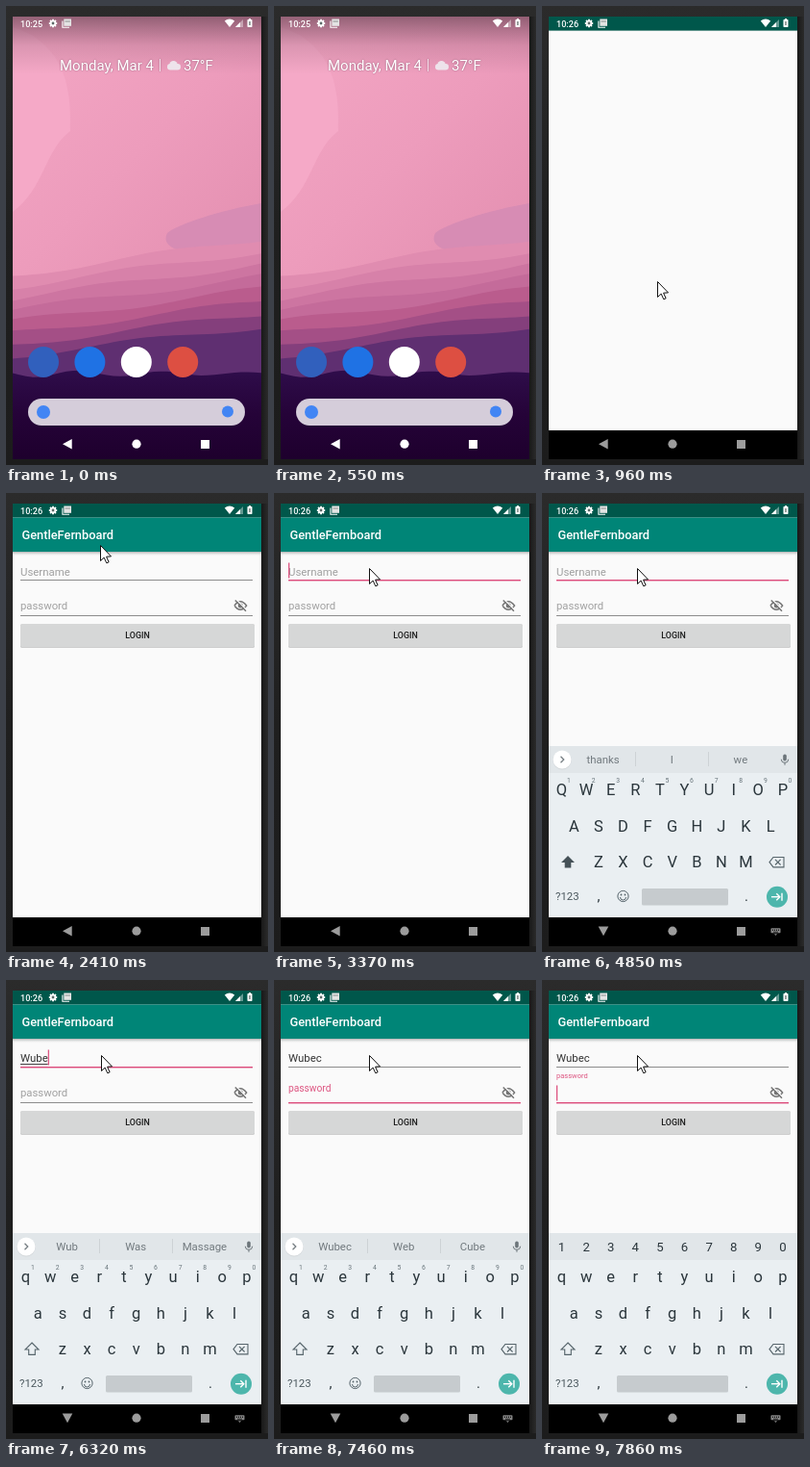
Write an HTML page with a canvas that moves like this. It is 273 px wide and 477 px high and loops after 8000 ms.

```html
<!DOCTYPE html>
<html lang="en">
<head>
<meta charset="utf-8">
<title>Phone login</title>
<style>
html, body { margin: 0; width: 100%; height: 100%; overflow: hidden; background: #202020; }
canvas { display: block; width: 273px; height: 477px; }
</style>
</head>
<body>
<canvas id="stage"></canvas>
<script>
const W = 273, H = 477, LOOP = 8000;
const LEFT = 7, TOP = 11, RIGHT = 266, BOTTOM = 471, WIDE = RIGHT - LEFT;
const NAV = 441, MID = 135.7, KEY = 25.6;
const PINK = '#dc4a7a', GREY = '#8c8c8c', HINT = '#a0a0a0', INK = '#2b363c', ICON = '#56646b';
const APP = 'GentleFernboard', USER = 'Wubec';

// Moments in ms
const OPEN = 960, FORM = 2410, FOCUS = 3100, NAV_DOWN = 3780, KEYS_IN = 4210, SHIFT_ON = 4730;
const TYPED = [5000, 5890, 6050, 6320, 6470];
const PASS = 7460, PASS_KEYS = 7740;
const WORDS = [[0, 'thanks I we'], [5150, 'W We Was'], [5890, 'Wu Wi Win'],
  [6190, 'Wub Was Massage'], [6470, 'Wubec Web Cube']];

const canvas = document.getElementById('stage');
const c = canvas.getContext('2d');
const dpr = window.devicePixelRatio || 1;
canvas.width = W * dpr;
canvas.height = H * dpr;

const mix = (a, b, k) => a + (b - a) * k;
const easeOut = k => 1 - (1 - k) ** 2;
const progress = (t, start, end) => Math.min(1, Math.max(0, (t - start) / (end - start)));

function rect(x, y, w, h, fill) {
  c.fillStyle = fill;
  c.fillRect(x, y, w, h);
}

function disc(x, y, r, fill) {
  c.fillStyle = fill;
  c.beginPath();
  c.arc(x, y, r, 0, 7);
  c.fill();
}

function pill(x, y, w, h, r, fill) {
  c.fillStyle = fill;
  c.beginPath();
  c.roundRect(x, y, w, h, r);
  c.fill();
}

function trace(points, closed) {
  c.beginPath();
  points.forEach(([x, y]) => c.lineTo(x, y));
  if (closed) c.closePath();
}

function poly(points, fill) {
  trace(points, true);
  c.fillStyle = fill;
  c.fill();
}

function line(points, color, width = 1, closed = false) {
  trace(points, closed);
  c.strokeStyle = color;
  c.lineWidth = width;
  c.stroke();
}

function text(str, x, y, size, color, align = 'left', weight = 400) {
  c.font = `${weight} ${size}px Roboto, sans-serif`;
  c.textAlign = align;
  c.fillStyle = color;
  c.fillText(str, x, y);
  return c.measureText(str).width;
}

function fade(x0, y0, x1, y1, ...colors) {
  const g = c.createLinearGradient(x0, y0, x1, y1);
  colors.forEach((col, i) => g.addColorStop(i / (colors.length - 1), col));
  return g;
}

// Fills everything below the curve y = height(x).
function hill(height, fill) {
  const points = [[RIGHT, BOTTOM], [LEFT, BOTTOM]];
  for (let x = LEFT; x <= RIGHT; x += 7) points.push([x, height(x)]);
  poly(points, fill);
}

function drawDesktop() {
  rect(0, 0, W, H, fade(0, 0, 0, H, '#2b2b2b', '#1f1f1f', '#1c1c1c'));
  rect(RIGHT, TOP, W - RIGHT, BOTTOM - TOP, fade(RIGHT, 0, W, 0, '#191919', '#2a2a2a'));
}

function drawStatus(clock) {
  const white = '#fff';
  text(clock, 15, 21.5, 9.1, white, 'left', 500);
  for (let i = 0; i < 4; i++) {
    const a = i * Math.PI / 4, dx = 4.2 * Math.cos(a), dy = 4.2 * Math.sin(a);
    line([[49 - dx, 18 - dy], [49 + dx, 18 + dy]], white, 1.9);
  }
  disc(49, 18, 3.2, white);
  disc(49, 18, 1.4, '#5c6a68');
  line([[58.9, 15.5], [58.9, 22.3], [66, 22.3]], white, 1.1);
  rect(60.3, 13.5, 7.7, 7.3, '#e4e4e4');
  line([[61.5, 16], [66.8, 16]], '#8a8f8e');
  c.fillStyle = white;
  c.beginPath();
  c.moveTo(233, 22);
  c.lineTo(227.8, 15.6);
  c.quadraticCurveTo(233, 11.6, 238.2, 15.6);
  c.fill();
  poly([[239, 22], [247, 22], [247, 14]], 'rgba(255,255,255,.4)');
  poly([[239, 22], [244, 22], [244, 17]], white);
  pill(251.5, 14, 5, 8, .8, white);
  rect(253, 13, 2, 1.2, white);
  rect(253.4, 16, 1.2, 4, '#55605e');
}

function drawNav(color, typing) {
  c.save();
  c.translate(64, 455.3);
  if (typing) c.rotate(-Math.PI / 2);
  poly([[4.7, -5.3], [4.7, 5.3], [-5, 0]], color);
  c.restore();
  disc(136, 455.2, 4.6, color);
  rect(203, 451, 9, 9, color);
  if (!typing) return;
  pill(238.5, 452.3, 10, 5, .8, '#858585');
  for (let x = 240; x < 248; x += 2) rect(x, 453.6, 1, 1.2, '#000');
  rect(241, 455.8, 5, .7, '#000');
  poly([[242, 458.3], [245, 458.3], [243.5, 460]], '#858585');
}

function drawWallpaper() {
  rect(LEFT, TOP, WIDE, BOTTOM - TOP, fade(30, 60, 230, 260, '#f2a4c2', '#ed9cbc', '#e591b2'));
  c.fillStyle = '#f5a9c7';
  c.beginPath();
  c.moveTo(LEFT, 22);
  c.bezierCurveTo(66, 40, 68, 95, 67, 130);
  c.bezierCurveTo(40, 150, 40, 190, LEFT, 214);
  c.fill();
  c.fillStyle = '#d78cb4';
  c.beginPath();
  c.moveTo(RIGHT, 205);
  c.bezierCurveTo(225, 212, 180, 226, 168, 236);
  c.bezierCurveTo(162, 248, 175, 256, 200, 256);
  c.lineTo(RIGHT, 245);
  c.fill();

  const bands = ['#e08cb0', '#d781a9', '#cd75a1', '#c46b9a', '#ba5c8d', '#a44f86', '#843f7c', '#5f2f71'];
  bands.forEach((fill, i) => {
    const left = 280 + 12 * i, right = 242 + 13 * i;
    hill(x => mix(left, right, (x - LEFT) / WIDE) + 3 * Math.sin(x / 35 + i), fill);
  });
  hill(x => 382 - 4 * (1 - x / 400) * Math.sin(x / 14 + 2.5), fade(0, 378, 0, BOTTOM, '#2f0d4b', '#250338', '#1e002d'));
  rect(LEFT, TOP, WIDE, 60, fade(0, 11, 0, 71, 'rgba(45,25,35,.48)', 'rgba(60,30,45,.14)', 'rgba(60,30,45,0)'));
}

function drawHome() {
  drawWallpaper();
  drawStatus('10:25');

  c.shadowColor = 'rgba(60,20,50,.5)';
  c.shadowBlur = 2 * dpr;
  text('Monday, Mar 4', 56, 67, 15, '#fff');
  rect(160, 55, 1, 13, '#f3dde8');
  text('37°F', 185, 67, 15, '#fff');
  c.shadowBlur = 0;
  pill(168, 60, 14, 6.5, 3.2, '#eee3eb');
  disc(174.5, 61.3, 4.3, '#eee3eb');

  ['#3160bd', '#1f72e4', '#ffffff', '#dd4f42'].forEach((col, i) => disc(39 + i * 48.4, 370, 16, col));
  pill(23, 408, 226, 28, 14, '#d5cdda');
  disc(39, 422, 7, '#4285f4');
  disc(231, 421.5, 6, '#4285f4');
  drawNav('#fff', false);
}

function drawCursor(t) {
  let x = 98, y = 54;
  if (t < 1110) [x, y] = [120, 286];
  else if (t < 1270) [x, y] = [108, 107];
  else if (t >= 2690) [x, y] = [99, mix(66, 78, progress(t, 2690, 2950))];
  c.save();
  c.translate(x + .5, y + .5);
  const shape = [[0, 0], [0, 16], [3.7, 12.6], [6.3, 18.3], [8.6, 17.3], [6.1, 11.7], [11, 11.4]];
  poly(shape, '#fff');
  line(shape, '#111', 1, true);
  c.restore();
}

function drawEye() {
  c.strokeStyle = '#747474';
  c.lineWidth = 1.5;
  c.beginPath();
  c.moveTo(238, 117);
  c.quadraticCurveTo(244.2, 108.5, 250.6, 117);
  c.quadraticCurveTo(244.2, 125.5, 238, 117);
  c.stroke();
  disc(244.3, 117, 2.5, '#747474');
  line([[239.8, 110.8], [251, 122]], '#fafafa', 1.5);
  line([[238.8, 111.5], [250, 122.7]], '#747474', 1.5);
}

function drawField(y, focused, caretX) {
  rect(15, y, 242, focused ? 1.4 : 1, focused ? PINK : GREY);
  if (caretX) rect(caretX, y - 17.5, 1.2, 16, PINK);
}

function drawForm(t) {
  rect(LEFT, 61, WIDE, 4, fade(0, 61, 0, 65, '#b4b4b4', '#e4e4e4', '#fafafa'));
  rect(LEFT, 25.6, WIDE, 35.4, '#008577');
  text(APP, 16.5, 48, 12.8, '#fff', 'left', 500);

  const onPass = t >= PASS, onUser = t >= FOCUS && !onPass;
  const count = TYPED.filter(time => t >= time).length;
  const lastEdit = Math.max(...[3220, ...TYPED, 7590].filter(time => t >= time));
  const caret = Math.floor((t - lastEdit) / 500) % 2 === 0;

  let typed = 0;
  if (count) typed = text(USER.slice(0, count), 15, 85, 11.4, '#333');
  else text('Username', 15, 85.5, 11.4, HINT);
  if (onUser) rect(15, 87, typed, 1, '#444');
  drawField(90, onUser, onUser && caret && 15 + typed);

  const rise = easeOut(progress(t, PASS - 50, PASS_KEYS));
  text('password', 15, mix(121, 102, rise), mix(11.3, 7.5, rise), onPass ? '#dd5581' : HINT);
  drawField(127, onPass, onPass && caret && 15);
  drawEye();

  pill(15, 136.5, 244, 24.3, 1.5, '#c0c0c0');
  pill(15, 136, 244, 24, 1.5, '#d6d7d7');
  text('LOGIN', 137, 151, 8.9, '#1c1c1c', 'center', 500);
}

function drawStrip(words) {
  disc(21, 277.6, 9.8, '#d3d7da');
  disc(21, 277, 9.5, '#fff');
  line([[19.5, 273.8], [22.7, 277], [19.5, 280.2]], '#777f84', 1.3);
  rect(97, 269, 1, 15, '#cdd2d5');
  rect(173, 269, 1, 15, '#cdd2d5');
  words.forEach((word, i) => text(word, 63.5 + i * 71.7, 281, 11.4, '#71797e', 'center'));
  pill(251.2, 271.5, 3.6, 7, 1.8, '#6c757a');
  c.strokeStyle = '#6c757a';
  c.lineWidth = 1;
  c.beginPath();
  c.arc(253, 276.7, 3.7, 0, Math.PI);
  c.moveTo(253, 280.4);
  c.lineTo(253, 282.8);
  c.stroke();
}

// One row of keys, centred on the keyboard.
function drawRow(keys, y, size = 16.5, color = INK, dx = 0) {
  const start = MID - KEY * (keys.length - 1) / 2 + dx;
  [...keys].forEach((key, i) => text(key, start + i * KEY, y, size, color, 'center'));
}

function drawKeys(upper, secret) {
  const digits = '1234567890';
  if (secret) drawRow(digits, 281.7, 13.2);
  else drawRow(digits, 301.2, 6.8, '#69757b', 7.5);
  ['qwertyuiop', 'asdfghjkl', 'zxcvbnm'].forEach((row, i) =>
    drawRow(upper ? row.toUpperCase() : row, 314.4 + 37.1 * i));

  const arrow = [[27, 377], [34, 384], [30.3, 384], [30.3, 389.4], [23.7, 389.4], [23.7, 384], [20, 384]];
  if (upper) poly(arrow, '#455157');
  else line(arrow, ICON, 1.1, true);
  line([[237, 383.7], [241, 378.5], [252, 378.5], [252, 388.9], [241, 388.9]], ICON, 1.1, true);
  for (const d of [-2.8, 2.8]) line([[245.8 - d, 380.9], [245.8 + d, 386.5]], ICON, 1.1);

  text('?123', 14, 423.3, 11.4, '#4a575d');
  text(',', 59, 424, 15, INK, 'center');
  text('.', 213, 424, 15, INK, 'center');
  const left = secret ? 78 : 104;
  pill(left, 411, 194 - left, 17.5, 1.5, '#c6cbce');
  if (!secret) drawSmile(84.5, 419);
  disc(245, 419.7, 11, '#4db6ac');
  line([[239, 419.7], [247.5, 419.7]], '#fff', 1.4);
  line([[244.3, 416.2], [247.8, 419.7], [244.3, 423.2]], '#fff', 1.4);
  line([[250, 415.7], [250, 423.7]], '#fff', 1.4);
}

function drawSmile(x, y) {
  c.strokeStyle = ICON;
  c.lineWidth = 1;
  c.beginPath();
  c.arc(x, y, 5.6, 0, 7);
  c.stroke();
  c.beginPath();
  c.arc(x, y + 1, 3, 0, Math.PI);
  c.stroke();
  disc(x - 2, y - 1.5, .9, ICON);
  disc(x + 2, y - 1.5, .9, ICON);
}

function drawKeyboard(t) {
  if (t < KEYS_IN) return;
  const enter = progress(t, KEYS_IN - 60, 4480);
  const secret = t >= PASS_KEYS;
  const words = WORDS.filter(([start]) => t >= start).pop()[1].split(' ');
  c.save();
  c.globalAlpha = easeOut(enter);
  c.translate(0, 9 * (1 - enter));
  rect(LEFT, 263, WIDE, 28, '#e1e6e9');
  rect(LEFT, 291, WIDE, NAV - 291, '#eaeff2');
  if (!secret) drawStrip(words);
  drawKeys(t >= SHIFT_ON && t < TYPED[0], secret);
  c.restore();
}

function drawApp(t) {
  rect(LEFT, TOP, WIDE, NAV - TOP, '#fafafa');
  rect(LEFT, TOP, WIDE, 14.6, '#00574b');
  drawStatus('10:26');
  if (t >= FORM) drawForm(t);
  rect(LEFT, NAV, WIDE, BOTTOM - NAV, '#000');
  drawNav('#9c9c9c', t >= NAV_DOWN);
  drawKeyboard(t);
  drawCursor(t);
}

function frame() {
  const t = performance.now() % LOOP;
  c.setTransform(dpr, 0, 0, dpr, 0, 0);
  drawDesktop();
  if (t < OPEN) drawHome();
  else drawApp(t);
  requestAnimationFrame(frame);
}
frame();
</script>
</body>
</html>
```
